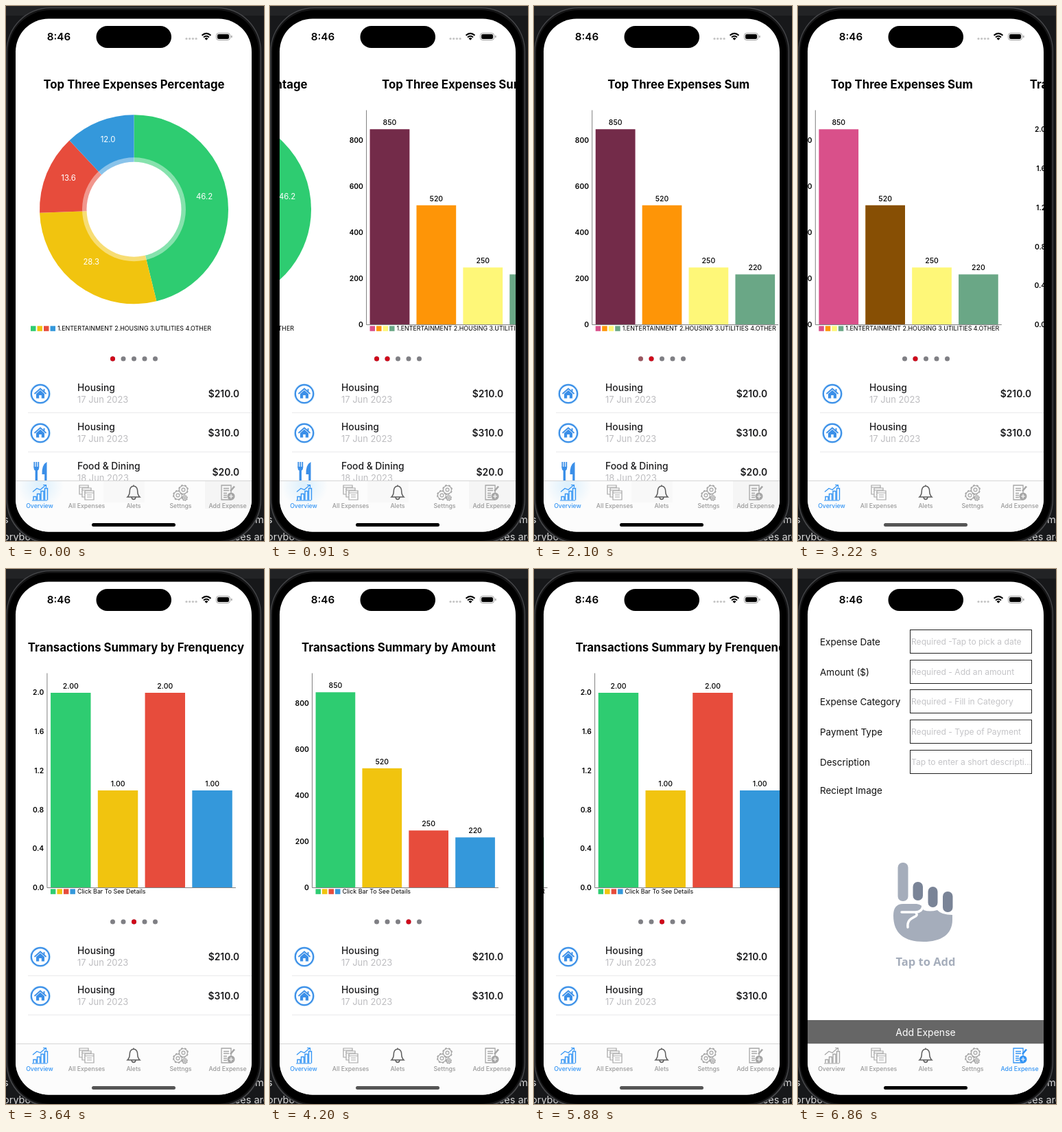
Write an HTML page with a canvas that moves like this. It is 376x778 px and loops after 8000 ms.

```html
<!DOCTYPE html>
<html lang="en">
<head>
<meta charset="utf-8">
<title>Expense tracker</title>
<style>
html, body { margin: 0; width: 100%; height: 100%; overflow: hidden; background: #17181a; }
canvas { display: block; }
</style>
</head>
<body>
<canvas id="stage" width="376" height="778"></canvas>
<script>
const ctx = document.getElementById('stage').getContext('2d');
const LOOP = 8000, STEP = 70, PAGE = 344;
const FILTER_AT = 2450, FORM_AT = 6860;
const FLAT = ['#2ecc71', '#f1c40f', '#e74c3c', '#3498db'];
const JOYFUL = ['#d9508a', '#fe9507', '#fef778', '#6aa786'];
const CATEGORIES = '1.ENTERTAINMENT 2.HOUSING 3.UTILITIES 4.OTHER';
const BLUE = '#3b8fe8', GREY = '#a6a6a6';

// Each swipe: start, duration, direction
const SWIPES = [
  [730, 450, 1], [1190, 475, -1], [1790, 560, 1],
  [3170, 650, 1], [3700, 640, 1], [4280, 680, 1],
  [5060, 520, -1], [5430, 415, -1], [5850, 420, -1]
];

function pageAt(t) {
  return SWIPES.reduce((sum, [start, duration, dir]) => {
    const u = Math.min(1, Math.max(0, (t - start) / duration));
    return sum + dir * (1 - (1 - u ** 1.5) ** 5);
  }, 0);
}

function text(str, x, y, size, color = '#000', weight = 400, align = 'left', family = 'Inter') {
  ctx.font = `${weight} ${size}px ${family}, sans-serif`;
  ctx.textAlign = align;
  ctx.fillStyle = color;
  ctx.fillText(str, x, y);
}

function rect(x, y, w, h, color) {
  ctx.fillStyle = color;
  ctx.fillRect(x, y, w, h);
}

function round(x, y, w, h, r, color) {
  ctx.beginPath();
  ctx.roundRect(x, y, w, h, r);
  ctx.fillStyle = color;
  ctx.fill();
}

function circle(x, y, r, color) {
  ctx.beginPath();
  ctx.arc(x, y, r, 0, Math.PI * 2);
  ctx.fillStyle = color;
  ctx.fill();
}

function line(d, color, width = 1) {
  ctx.strokeStyle = color;
  ctx.lineWidth = width;
  ctx.stroke(new Path2D(d));
}

function shape(d, color) {
  ctx.fillStyle = color;
  ctx.fill(new Path2D(d));
}

function at(x, y, draw) {
  ctx.save();
  ctx.translate(x, y);
  draw();
  ctx.restore();
}

function title(str) {
  text(str, 186.5, 119.7, 16.75, '#000', 700, 'center');
}

function legend(x, colors, label) {
  colors.forEach((c, i) => rect(x + i * 9.5, 465.3, 7.5, 7.5, c));
  text(label, x + colors.length * 9.5 + 1, 472.2, 8.87);
}

function pieChart() {
  const cx = 186.5, cy = 295.7, values = [46.2, 28.3, 13.6, 12];
  const total = values.reduce((a, b) => a + b);
  let from = -Math.PI / 2;
  title('Top Three Expenses Percentage');
  values.forEach((v, i) => {
    const to = from + v / total * Math.PI * 2, mid = (from + to) / 2;
    ctx.beginPath();
    ctx.moveTo(cx, cy);
    ctx.arc(cx, cy, 137.5, from, to);
    ctx.fillStyle = FLAT[i];
    ctx.fill();
    text(v.toFixed(1), cx + 103.3 * Math.cos(mid), cy + 103.3 * Math.sin(mid) - 2, 11.4, '#fff', 400, 'center');
    from = to;
  });
  circle(cx, cy, 75.5, 'rgba(255,255,255,.42)');
  circle(cx, cy, 69, '#fff');
  legend(36, FLAT, CATEGORIES);
}

function barChart({ name, left, values, colors, digits, ticks, tickDigits, scale, marked, caption }) {
  const base = 464, pitch = (332 - left) / 4, width = pitch * 0.85;
  title(name);
  ticks.forEach(v => text(v.toFixed(tickDigits), left - 4.7, base - v * scale + 3.2, 10.3, '#000', 600, 'right'));
  values.forEach((v, i) => {
    const x = left + pitch * (i + 0.075), top = base - v * scale;
    rect(x, top, width, base - top, colors[i]);
    if (i === marked) rect(x, top, width, base - top, 'rgba(0,0,0,.47)');
    text(v.toFixed(digits), x + width / 2, top - 6, 10.5, '#000', 500, 'center');
  });
  line(`M${left} 151.5V463.5H332`, '#808080');
  legend(left + 5, colors, caption);
}

const sumChart = {
  name: 'Top Three Expenses Sum', left: 60.5, values: [850, 520, 250, 220], colors: JOYFUL,
  digits: 0, ticks: [0, 200, 400, 600, 800], tickDigits: 0, scale: 0.335, caption: CATEGORIES
};
const countChart = {
  name: 'Transactions Summary by Frenquency', left: 57, values: [2, 1, 2, 1], colors: FLAT,
  digits: 2, ticks: [0, 0.4, 0.8, 1.2, 1.6, 2], tickDigits: 1, scale: 142, caption: 'Click Bar To See Details'
};
const amountChart = {
  ...sumChart, name: 'Transactions Summary by Amount', colors: FLAT, caption: countChart.caption
};

function lineChart() {
  title('Cumulative Expense for Current Month');
  for (let i = 0; i < 7; i++) text(i * 300, 61.5, 450.8 - i * 44, 10.3, '#000', 600, 'right');
  for (let d = 5; d <= 30; d += 5) text(d, 57 + d * 8.87, 461.5, 10.3, '#000', 600, 'center');
  line('M225.5 152V447', '#dedede');
  line('M66 152V447.5H332', '#808080');
  line('M66 389H332', '#a39483', 1.7);
  ctx.save();
  ctx.beginPath();
  ctx.rect(66, 150, 268, 298);
  ctx.clip();
  const curve = 'M66 447.5H121M128 448C134 442 134 416 140 416S143 418.3 146 418.3H189' +
    'C193 418 194 425.5 197 425.5C201 425 205 385 208 355C214 295 215 164 220 164C223 164 222 178.3 226 178.3H332';
  at(0.8, 0.8, () => line(curve, '#7fe3ee', 2.4));
  line(curve, '#35b9a4', 2.2);
  ctx.restore();
  legend(71, ['#2e9fc4'], 'Acummulative Expense');
  legend(184, ['#e5394f'], 'Monthly Cap');
}

function pages(t) {
  const pos = pageAt(t);
  const sum = { ...sumChart, marked: t < FILTER_AT ? 0 : 1 };
  const draws = [pieChart, () => barChart(sum), () => barChart(countChart), () => barChart(amountChart), lineChart];
  draws.forEach((draw, i) => {
    const offset = (i - pos) * PAGE;
    if (Math.abs(offset) < PAGE) at(offset, 0, draw);
  });

  // The active dot lights at once, the former one fades
  const active = ago => Math.round(pageAt(t - ago));
  for (let i = 0; i < 5; i++) {
    const fade = [70, 140, 210].filter(ago => active(ago) === i).length / 3;
    const x = 155.5 + i * 15.5;
    circle(x, 513, 3.5, '#7f7f84');
    ctx.globalAlpha = active(0) === i ? 1 : fade;
    circle(x, 513, 3.5, '#d0061a');
    ctx.globalAlpha = 1;
  }
}

function houseIcon() {
  circle(0, 0, 15.6, '#e6f5fd');
  circle(0, 0, 14.3, BLUE);
  circle(0, 0, 12, '#fafdff');
  line('M-8.5 0L0 -7.5L8.5 0M5.5 -7V-3', BLUE, 1.8);
  shape('M-6 0L0 -5.2L6 0V6.5H1.8V2H-1.8V6.5H-6Z', BLUE);
}

function cutleryIcon() {
  line('M-8.7 -15V-7M-5.7 -15V-7M-2.7 -15V-7', BLUE, 1.8);
  shape('M-9.6 -8H-1.8Q-1.8 -3 -4 -2.5V16H-7.4V-2.5Q-9.6 -3 -9.6 -8Z', BLUE);
  shape('M9.5 -15V16H6.2V3H2.5Q2 -11 9.5 -15Z', BLUE);
}

function expenseList(filtered) {
  const rows = [['Housing', '17 Jun 2023', '$210.0'], ['Housing', '17 Jun 2023', '$310.0']];
  if (!filtered) rows.push(['Food & Dining', '18 Jun 2023', '$20.0']);
  rows.forEach(([name, date, amount], i) => {
    const y = i * 57;
    at(50, 564 + y, i < 2 ? houseIcon : cutleryIcon);
    text(name, 104, 560 + y, 13.85, '#1c1c1e', 500);
    text(date, 104, 577 + y, 12.9, '#bdbdc0');
    text(amount, 340, 568.6 + y, 13.8, '#1c1c1e', 600, 'right');
    rect(32, 591 + y, 326, 1, '#e9e9eb');
  });
}

function hand() {
  const light = '#a5adbb', dark = '#7a8497';
  round(145.5, 427, 15, 56, 7, light);
  round(167.5, 455, 14.5, 27, 7, dark);
  round(189.5, 462, 14, 30, 7, dark);
  round(211, 469, 14.5, 30, 7, dark);
  shape('M139 504Q139 487 153 487H173Q182 488 183 496Q192 499 203 496Q209 503 225 503V510' +
    'C225 532 208 542 183 542C155 542 139 530 139 504Z', light);
  ctx.lineCap = 'round';
  line('M151 499H171Q181 499 182 490M171 499C180 508 158 503 160 521', '#fff', 3.5);
  ctx.lineCap = 'butt';
  text('Tap to Add', 186, 576.5, 16.5, light, 700, 'center', 'Open Sans');
}

function expenseForm() {
  const fields = [
    ['Expense Date', 'Required -Tap to pick a date'],
    ['Amount ($)', 'Required - Add an amount'],
    ['Expense Category', 'Required - Fill in Category'],
    ['Payment Type', 'Required - Type of Payment'],
    ['Description', 'Tap to enter a short descripti…']
  ];
  fields.forEach(([label, hint], i) => {
    const y = Math.round(i * 43.7);
    text(label, 32, 110.5 + y, 13.5, '#111');
    ctx.strokeStyle = '#222';
    ctx.lineWidth = 1;
    ctx.strokeRect(163.5, 88.5 + y, 177, 34);
    text(hint, 165, 110 + y, 12.1, '#c4c4c7');
  });
  text('Reciept Image', 32, 326.5, 13.5, '#111');
  hand();
  rect(14, 656, 344, 35, '#666');
  text('Add Expense', 186, 679, 14, '#fff', 400, 'center');
}

const TABS = [
  ['Overview', c => {
    [5, 9, 13, 17].forEach((h, i) => line(`M${-9 + i * 5.5} 11V${11 - h}h4V11`, c, 1.4));
    line('M-11 11.5H11M-10 -1L-4 -6L1 -4L9 -11M5 -11H9.5V-7', c, 1.2);
  }],
  ['All Expenses', c => {
    [[-10.5, -10.5], [-6.5, -6.5], [-2.5, -2.5]].forEach(([x, y]) => {
      rect(x, y, 13, 13, '#fff');
      line(`M${x} ${y}h13v13h-13ZM${x} ${y + 3}h13M${x + 3} ${y + 6}h7M${x + 3} ${y + 9}h7`, c, 1.2);
    });
  }],
  ['Alets', () => {
    line('M-9 6.5C-5 3 -6 -1 -5.5 -4C-4 -11 4 -11 5.5 -4C6 -1 5 3 9 6.5ZM-3 7C-2 11 2 11 3 7M0 -9V-11', '#5c5c5c', 1.5);
  }],
  ['Settngs', c => {
    [[-4, 4, 6], [4, -4, 6], [6, 8, 3]].forEach(([x, y, r]) => {
      const ring = `M${x - r} ${y}a${r} ${r} 0 1 0 ${2 * r} 0a${r} ${r} 0 1 0 ${-2 * r} 0`;
      ctx.setLineDash([r * 0.42, r * 0.365]);
      line(ring, c, 3);
      ctx.setLineDash([]);
      circle(x, y, r, '#f8f8f8');
      line(ring, c, 1.1);
      ctx.beginPath();
      ctx.arc(x, y, r * 0.4, 0, Math.PI * 2);
      ctx.stroke();
    });
  }],
  ['Add Expense', c => {
    line('M-9 -10.5H5V10.5H-9ZM-6 -6H2M-6 -3H2M-6 1H-1M-6 4H-1M-6 7H-1', c, 1.3);
    circle(5, 5.5, 5.5, c);
    line('M5 2.5V8.5M2 5.5H8', '#fff', 1.2);
    line('M4 -2L10 -9', c, 2.6);
  }]
];

function tabBar(t) {
  const form = t >= FORM_AT, filtered = t >= FILTER_AT;
  rect(14, 690, 344, 80, '#fcfcfc');
  if (!filtered) {
    const bleed = ctx.createRadialGradient(50, 697, 2, 50, 697, 34);
    bleed.addColorStop(0, '#ddf0fc');
    bleed.addColorStop(1, '#fcfcfc');
    rect(16, 691, 68, 42, bleed);
    rect(142, 691, 60, 31, '#f8f8f8');
    rect(290, 691, 68, 40, '#f5f5f5');
  }
  rect(14, 690, 344, 1, '#d6d6d6');
  TABS.forEach(([label, icon], i) => {
    const active = i === (form ? 4 : 0), x = 49 + i * 68.5;
    at(x, 707.5, () => icon(active ? '#3394f4' : GREY));
    text(label, x, 730.3, 8.75, active ? '#3394f4' : '#999', 500, 'center');
  });
  round(125, 752, 122, 5, 2.5, filtered && !form ? '#555' : '#000');
}

function statusBar() {
  text('8:46', 77, 50, 15.2, '#000', 600, 'center');
  round(131.5, 29, 109.5, 32, 16, '#000');
  for (let i = 0; i < 4; i++) circle(263 + i * 4.7, 47.5, 1.6, '#c4c4c4');
  line('M285.5 42.7Q292 37 298.5 42.7M288 45.5Q292 42 296 45.5', '#000', 2);
  shape('M289.5 47.2Q292 45 294.5 47.2L292 49.7Z', '#000');
  ctx.beginPath();
  ctx.roundRect(306.5, 39.5, 20, 10, 3.2);
  ctx.strokeStyle = '#999';
  ctx.lineWidth = 1;
  ctx.stroke();
  round(308, 41, 17, 7, 2, '#000');
  round(328, 42.7, 1.5, 3.6, 0.8, '#999');
}

function phone() {
  rect(0, 0, 376, 778, '#17181a');
  rect(0, 0, 376, 14, '#222325');
  text('s', -4, 752, 14.5, '#d8d8d8');
  text('orybook', -4, 776.5, 14.5, '#d8d8d8');
  text('m', 363, 752, 14.5, '#d8d8d8');
  text('ces are', 333, 776.5, 14.5, '#d8d8d8');
  round(0.5, 2, 371.5, 780, 64, '#47484b');
  round(1.7, 3.2, 369, 777, 63, '#141415');
  round(3.5, 6, 365, 772, 61, '#000');
}

function frame(now) {
  const t = Math.floor(now % LOOP / STEP) * STEP;
  phone();
  ctx.save();
  round(14, 18.5, PAGE, 746, 48, '#fff');
  ctx.clip();
  statusBar();
  if (t >= FORM_AT) {
    expenseForm();
  } else {
    pages(t);
    expenseList(t >= FILTER_AT);
  }
  tabBar(t);
  ctx.restore();
  requestAnimationFrame(() => frame(performance.now() - begin));
}

const begin = performance.now();
frame(0);
</script>
</body>
</html>
```
